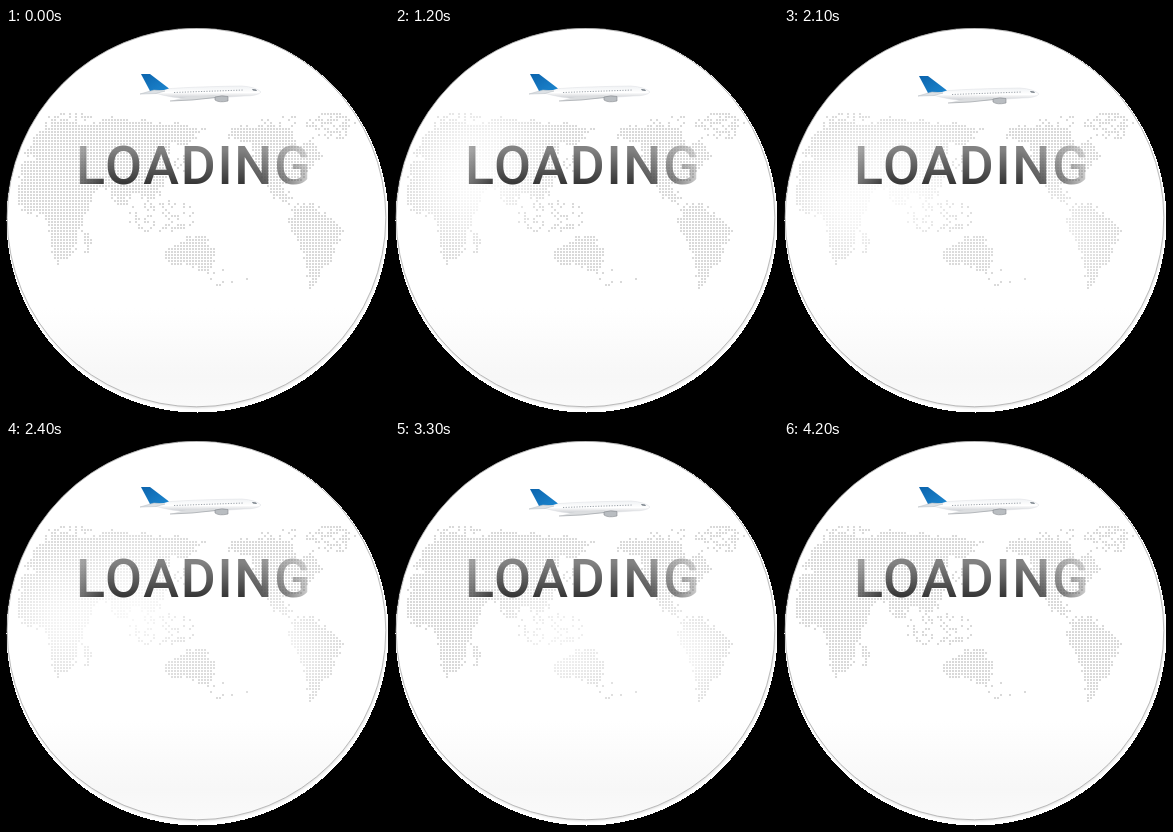
Recreate the animation shown at these times as an HTML page with a canvas. Size 383 by 385 pixels, loop 4500 ms.

```html
<!DOCTYPE html>
<html lang="en">
<head>
<meta charset="utf-8">
<title>Loading</title>
<style>
  html, body { margin: 0; width: 100%; height: 100%; overflow: hidden; background: #000; }
  svg, canvas { position: absolute; left: 0; top: 0; width: 383px; height: 385px; }
  .word { font: 500 53.5px Roboto, sans-serif; letter-spacing: 1.8px; }
</style>
</head>
<body>
<svg viewBox="0 0 383 385">
  <defs>
    <linearGradient id="disc" x2="0" y2="1">
      <stop offset=".74" stop-color="#fff"/>
      <stop offset=".92" stop-color="#f7f7f7"/>
      <stop offset="1" stop-color="#fafafa"/>
    </linearGradient>
    <filter id="soft"><feGaussianBlur stdDeviation="1"/></filter>
  </defs>
  <ellipse cx="191.5" cy="192.5" rx="191" ry="192" fill="#fff" shape-rendering="crispEdges"/>
  <circle cx="191" cy="191" r="189" fill="#ddd" filter="url(#soft)"/>
  <circle cx="190.5" cy="189.5" r="189.3" fill="url(#disc)" stroke="#aaa" stroke-width=".8"/>
</svg>

<canvas id="map" width="383" height="385"></canvas>

<svg viewBox="0 0 383 385">
  <defs>
    <linearGradient id="ink" x2="0" y2="1">
      <stop offset=".25" stop-color="#828282"/>
      <stop offset=".8" stop-color="#343434"/>
    </linearGradient>
    <linearGradient id="fade">
      <stop offset="0" stop-color="#aaa"/>
      <stop offset=".12" stop-color="#fff"/>
      <stop offset=".7" stop-color="#fff"/>
      <stop offset=".88" stop-color="#999"/>
      <stop offset="1" stop-color="#222"/>
    </linearGradient>
    <mask id="shade"><rect x="72" y="105" width="238" height="65" fill="url(#fade)"/></mask>
    <linearGradient id="hull" x2="0" y2="1">
      <stop offset="0" stop-color="#f0f2f4"/>
      <stop offset=".5" stop-color="#fff"/>
      <stop offset="1" stop-color="#c2c5ca"/>
    </linearGradient>
    <linearGradient id="fin" x2="1" y2="1">
      <stop offset="0" stop-color="#0c64ad"/>
      <stop offset="1" stop-color="#1c86cf"/>
    </linearGradient>
  </defs>
  <g mask="url(#shade)"><text class="word" x="70" y="156" fill="url(#ink)">LOADING</text></g>
  <g id="plane">
    <path d="M143 63 Q165 59 236 58 Q250 59 255 64 Q252 68 238 68 L190 71 Q165 71 143 63Z" fill="url(#hull)" stroke="#dcdfe2" stroke-width=".5"/>
    <path d="M135 46 H144 L163 60.500 L158 62 L144 63Z" fill="url(#fin)"/>
    <path d="M134 66 L148 62 L159 63 L150 65.500Z" fill="#dde1e5" stroke="#b5bac1" stroke-width=".5"/>
    <path d="M168 64.500 L238 62" stroke="#9aa1a8" stroke-dasharray="1.200 1.500"/>
    <path d="M246 61 L250 61.500 L251 63 L247 62.500Z" fill="#6d767f"/>
    <path d="M164 73 L180 69 L208 67 L214 69 L186 72Z" fill="#dcdee0"/>
    <path d="M164 73 L186 72 L214 69" fill="none" stroke="#9ea2a6" stroke-width=".7"/>
    <path d="M209 69 Q216 67 222 68.500 L222 73 Q213 75 209 72Z" fill="#b9bdc1" stroke="#85898d" stroke-width=".6"/>
  </g>
</svg>

<script>
const STEP = 300, COUNT = 15, PITCH = 3;
const ctx = document.getElementById('map').getContext('2d');
const plane = document.getElementById('plane');

// Rough outlines; the coast is roughened with seeded noise
const land = new Path2D([
  'M18 131L60 131L77 167L86 168L66 226L50 238L40 189L18 183L11 165Z',                   // Africa
  'M20 128L25 113L48 90L75 97L110 90L200 100L182 118L166 116L160 156L142 178L130 163L115 179L100 158L78 172L60 136Z',
  'M160 223L185 207L198 207L211 227L201 246L182 236L162 239Z',                       // Australia
  'M220 110L230 98L285 100L292 120L305 110L317 127L295 151L276 158L289 180L267 169L249 140L245 116Z',
  'M287 179L303 175L337 200L326 228L305 262L297 226L282 196Z'                        // South America
].join(''));

// Island groups: centre, radii, density
const islands = [
  { x: 155, y: 188, rx: 34, ry: 18, fill: .35 },
  { x: 176, y: 136, rx: 10, ry: 9, fill: .4 },
  { x: 280, y: 95, rx: 28, ry: 8, fill: .35 },
  { x: 328, y: 98, rx: 22, ry: 15, fill: .5 },
  { x: 223, y: 250, rx: 20, ry: 9, fill: .2 },
  { x: 81, y: 214, rx: 5, ry: 11, fill: .8 },
  { x: 75, y: 90, rx: 34, ry: 5, fill: .3 }
];

// Drifting mist: path, radius, first step and length in steps
const mist = [
  { from: [95, 135], to: [40, 195], r: 52, start: 0, span: 11 },
  { from: [65, 100], to: [195, 230], r: 58, start: 2, span: 12 },
  { from: [265, 200], to: [290, 220], r: 48, start: 6, span: 8 }
];

let seed = 7;
const random = () => (seed = seed * 16807 % 2147483647) / 2147483647;
const mix = (a, b, u) => a + (b - a) * u;

function isLand(x, y) {
  const rough = () => (random() - .5) * 5;
  return ctx.isPointInPath(land, x + rough(), y + rough()) ||
    islands.some(i => ((x - i.x) / i.rx) ** 2 + ((y - i.y) / i.ry) ** 2 < 1 && random() < i.fill);
}

const dots = [];
for (let y = 85; y < 268; y += PITCH)
  for (let x = 6; x < 353; x += PITCH)
    if (isLand(x + 1, y + 1)) dots.push({ x, y });

function cover({ from, to, r, start, span }, dot, step) {
  const u = (step - start) / span;
  if (u <= 0 || u >= 1) return 0;
  const dx = dot.x - mix(from[0], to[0], u);
  const dy = dot.y - mix(from[1], to[1], u);
  return .8 * Math.sqrt(Math.sin(Math.PI * u)) * Math.exp(-(dx * dx + dy * dy) / (r * r));
}

function draw(step) {
  ctx.clearRect(0, 0, 383, 385);
  ctx.fillStyle = '#d9d9d9';
  for (const dot of dots) {
    ctx.globalAlpha = mist.reduce((a, m) => a * (1 - cover(m, dot, step)), 1);
    ctx.fillRect(dot.x, dot.y, 2, 2);
  }
  // Bob over four steps; the last step is back at the top
  const drop = 2 - 2 * Math.cos(step % (COUNT - 1) * Math.PI / 2);
  plane.setAttribute('transform', `translate(0 ${Math.round(drop)})`);
}

let last = -1;
function tick() {
  const step = Math.floor(performance.now() / STEP) % COUNT;
  if (step !== last) draw(last = step);
  requestAnimationFrame(tick);
}
tick();
</script>
</body>
</html>
```
